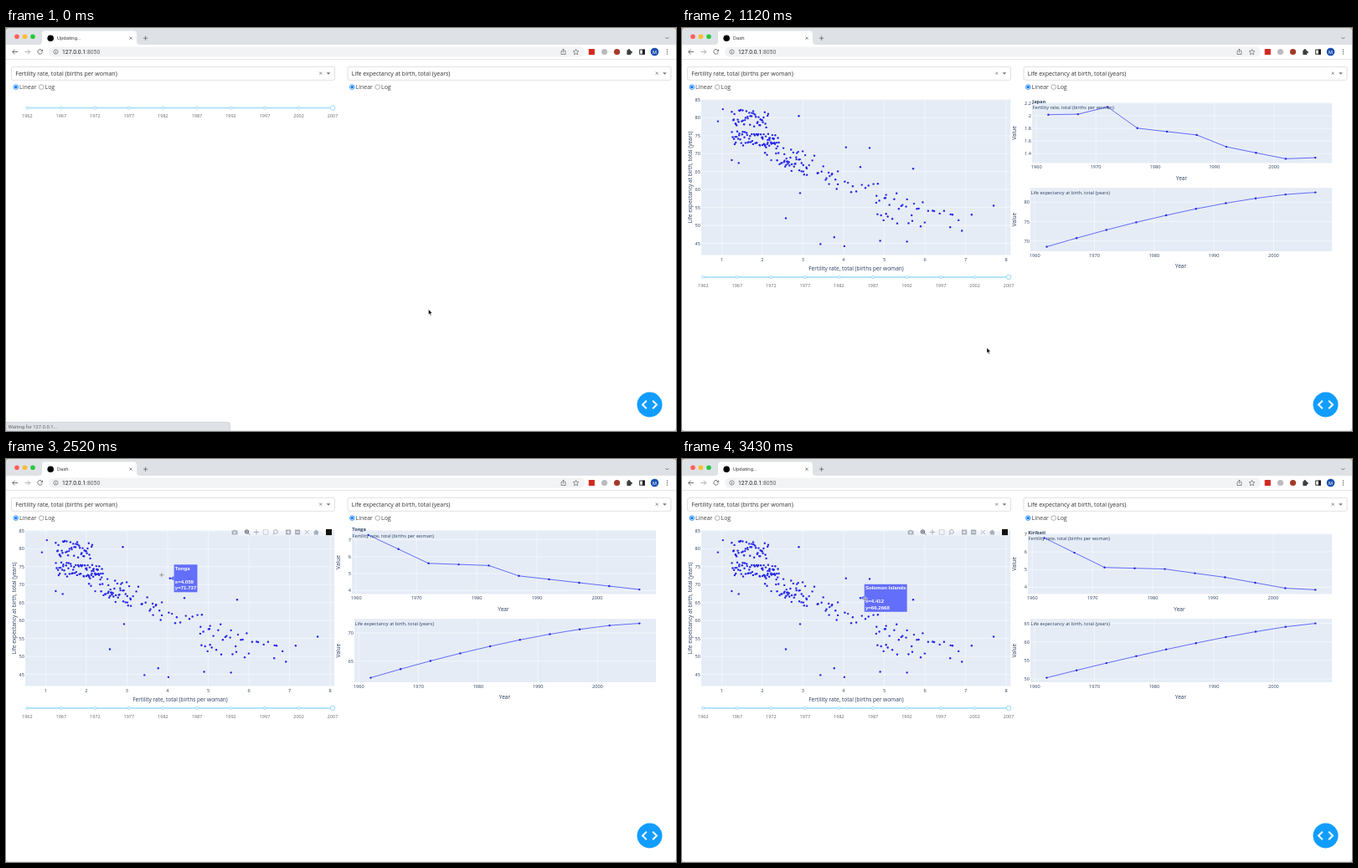
Recreate the animation shown at these times as an HTML page. Size 800 by 482 pixels, loop 3500 ms.

```html
<!DOCTYPE html>
<html lang="en">
<head>
<meta charset="utf-8">
<title>Dash</title>
<style>
  html, body { margin: 0; width: 100%; height: 100%; overflow: hidden; background: #fff; }
  svg { display: block; width: 800px; height: 482px; }
  text { font-family: "Open Sans", sans-serif; white-space: pre; }
  .ui { font-family: Roboto, sans-serif; }
  .tip { font-family: "Liberation Sans", Arial, sans-serif; font-weight: 700; }
</style>
</head>
<body>
<svg id="stage" viewBox="0 0 800 482"></svg>
<script>
const LOOP = 3500, STEP = 70;
const INK = '#2a3f5f', GREY = '#5f6368', PLOT = '#e5ecf6', LINE = '#5c66f5', DOT = '#2626e6';
const FERT = 'Fertility rate, total (births per woman)';
const LIFE = 'Life expectancy at birth, total (years)';

const attrs = o => Object.entries(o).map(([k, v]) => ` ${k}="${v}"`).join('');
const el = (tag, o, body = '') => `<${tag}${attrs(o)}>${body}</${tag}>`;
const rect = (x, y, width, height, fill, o = {}) => el('rect', { x, y, width, height, fill, ...o });
const circle = (cx, cy, r, fill, o = {}) => el('circle', { cx, cy, r, fill, ...o });
const ring = (x, y, r, stroke, w, fill = '#fff') => circle(x, y, r, fill, { stroke, 'stroke-width': w });
const path = (d, stroke, w = 1) => el('path', { d, fill: 'none', stroke, 'stroke-width': w });
const shape = (d, fill, o = {}) => el('path', { d, fill, ...o });
const text = (x, y, s, size, fill = INK, o = {}) => el('text', { x, y, 'font-size': size, fill, ...o }, s);
const MID = { 'text-anchor': 'middle' }, END = { 'text-anchor': 'end' }, UI = { class: 'ui' };
const turned = (x, y, s) =>
  text(0, 0, s, 6.56, INK, { ...MID, transform: `translate(${x} ${y}) rotate(-90)` });
const cross = (x, y, r) => `M${x - r} ${y - r}l${2 * r} ${2 * r}m0 ${-2 * r}l${-2 * r} ${2 * r}`;
const plus = (x, y, r) => `M${x - r} ${y}h${2 * r}m${-r} ${-r}v${2 * r}`;
const range = (n, f) => Array.from({ length: n }, (_, i) => f(i));
const mix = (a, b, p) => a + (b - a) * p;

function browser() {
  return rect(0, 0, 800, 482, '#c9b68c') + rect(0, 8, 800, 474, '#d5d7da') +
    rect(0, .5, 800, 481, '#fff', { rx: 4 }) +
    shape('M0 20V4.5Q0 .5 4 .5H796Q800 .5 800 4.5V20Z', '#dee1e6') +
    shape('M39 20Q43 20 43 16V7Q43 3.5 46.5 3.5H152.5Q156 3.5 156 7V16Q156 20 160 20Z', '#fff') +
    rect(0, 20, 800, 17.5, '#fff') + rect(0, 37.3, 800, .7, '#dcdee1') +
    rect(51, 22.6, 640, 11.8, '#f1f3f4', { rx: 5.9 }) +
    ['#ff5f57', '#febc2e', '#28c840'].map((c, i) => circle(13 + i * 9.5, 10.2, 2.8, c)).join('') +
    circle(53.2, 12.2, 3.8, '#000') +
    path(cross(149, 12.2, 1.5) + plus(166.6, 12.2, 2.6) + 'M787.4 11l2 2 2 -2', GREY, .8) +
    path('M14 28.5H7.7m2.8 -2.8l-2.8 2.8 2.8 2.8', GREY, .9) +
    path('M22.5 28.5h6.3m-2.8 -2.8l2.8 2.8 -2.8 2.8', '#a5a8ac', .9) +
    path('M43 26.8a2.8 2.8 0 1 0 .3 2.4m.2 -3.5v2h-2', GREY, .9) +
    ring(59.5, 28.5, 2.6, GREY, .7, 'none') + path('M59.5 28v2m0 -3.2v.6', GREY, .7) +
    text(67, 30.9, '127.0.0.1<tspan fill="#5f6368">:8050</tspan>', 6.8, '#202124', UI) +
    path('M664.3 27.5h-1.3v4h5v-4h-1.3m-1.2 2v-4.5m-1.5 1.5l1.5 -1.5 1.5 1.5', GREY, .7) +
    path('M680.5 25.4l1 2.1 2.3 .3 -1.7 1.6 .4 2.3 -2 -1.1 -2 1.1 .4 -2.3 -1.7 -1.6 2.3 -.3z', GREY, .7) +
    rect(695.7, 25, 7.2, 7, '#d22b22', { rx: .6 }) +
    circle(714.5, 28.5, 3.6, '#b9bbbe') + circle(729.5, 28.5, 3.6, '#a33a2a') +
    rect(741.3, 26.5, 5, 5.4, '#3c4043', { rx: .6 }) + circle(743.8, 26.3, 1.2, '#3c4043') +
    circle(746.6, 29, 1.2, '#3c4043') +
    rect(756.7, 26, 5.6, 5.2, 'none', { stroke: '#202124', 'stroke-width': .9 }) +
    rect(759.8, 25.6, 3, 6, '#202124') +
    circle(774.5, 28.5, 4.8, '#1a4fb0') + text(774.5, 30.6, 'M', 5.6, '#fff', { ...UI, ...MID }) +
    range(3, i => circle(789.5, 26 + i * 2.5, .75, GREY)).join('');
}

function controls(x, label) {
  const radio = (dx, name, on) =>
    ring(x + dx, 70.6, 2.8, on ? '#0075ff' : '#777', on ? .8 : .6) +
    (on ? circle(x + dx, 70.6, 1.7, '#0075ff') : '') +
    text(x + dx + 4.3, 73.2, name, 7, '#444');
  return rect(x, 46.3, 386, 16, '#fff', { rx: 2, stroke: '#ccc', 'stroke-width': .6 }) +
    text(x + 4.8, 57, label, 7, '#333') +
    path(cross(x + 369.2, 54.2, 1.5), '#777', .8) +
    shape(`M${x + 376.2} 53.2h4.6l-2.3 2.5z`, '#777') +
    radio(5.3, 'Linear', true) + radio(35.7, 'Log', false);
}

const devButton = () => circle(768.5, 450.5, 15, '#119dff') +
  path('M764.8 445.8l-4.8 4.7 4.8 4.7m7.4 -9.4l4.8 4.7 -4.8 4.7', '#fff', 2);

const slider = y => rect(25, y - .9, 365, 1.8, '#abe2fb') + range(10, i => {
  const x = 25.3 + i * 40.53;
  return ring(x, y, i < 9 ? 1.5 : 2.8, '#8fd6f8', .9) + text(x, y + 11.6, 1962 + i * 5, 5.5, '#666', MID);
}).join('');

function modebar(x, y) {
  const c = '#a9b0bd', dark = '#555d6b';
  return el('g', { transform: `translate(${x} ${y})` },
    rect(-5, -4, 121.5, 8, '#fff', { opacity: .4 }) +
    shape('M-3.5 -1.8h1.8l.6 -1h2.2l.6 1h1.8v4.8h-7z', c) + circle(0, .4, 1.4, PLOT) +
    ring(14.5, -.5, 2.2, dark, 1, 'none') + path('M16.2 1.2l2 2' + plus(14.5, -.5, 1.1), dark, .9) +
    path(plus(26, 0, 3.1), c) +
    rect(34.2, -2.8, 5.8, 5.6, 'none', { stroke: c, 'stroke-width': .8, 'stroke-dasharray': '1.4 .7' }) +
    ring(49, -.5, 2.4, c, 1, 'none') + path('M47 1l-.8 2.2', c) +
    rect(61, -3, 6.2, 6, c) + path(plus(64.1, 0, 1.8), '#fff', .9) +
    rect(72, -3, 6.2, 6, c) + path('M73.3 0h3.6', '#fff', .9) +
    path(cross(86.3, 0, 2.6), c, .9) +
    shape('M93.8 .2l3.6 -3.2 3.6 3.2h-1v2.8h-5.2v-2.8z', c) +
    rect(109, -3.6, 7, 7.2, '#111'));
}

// Curves over the ten surveys, from 0 to 1
const rise = bend => i => 1 - (1 - i / 9) ** bend;
const fall = (mid, k) => i => 1 / (1 + Math.exp((i - mid) * k));
const bent = (...keys) => i => {
  const b = Math.max(1, keys.findIndex(k => k[0] >= i));
  const [i0, p0] = keys[b - 1], [i1, p1] = keys[b];
  return mix(p0, p1, (i - i0) / (i1 - i0));
};

// at: place in the scatter plot; fert and life: lowest, highest, curve
const PLACES = {
  Japan: {
    fert: [1.32, 2.14, bent([0, .85], [1, .86], [2, 1], [3, .59], [5, .46], [6, .23], [8, 0], [9, .02])],
    life: [68.5, 82.56, rise(1.47)]
  },
  Kenya: { at: [4.803, 56.331], fert: [4.85, 8.1, fall(5.05, 1.05)], life: [47.4, 59.3, i => Math.sin(i * .36)] },
  'Solomon Islands': { at: [4.412, 66.2668], fert: [4.41, 7.25, fall(5, .8)], life: [51, 66.27, rise(1.2)] },
  Tonga: {
    at: [4.059, 71.737],
    fert: [4.06, 7.28, bent([0, 1], [2, .48], [4, .44], [5, .25], [9, 0])],
    life: [62.06, 71.68, rise(1.47)]
  },
  World: {
    at: [2.542742, 69.84195],
    fert: [2.54, 5.02, bent([0, 1], [1, .98], [3, .57], [5, .38], [7, .085], [9, 0])],
    life: [48.3, 72.56, rise(1.15)]
  },
  Kiribati: {
    at: [3.858, 65.074],
    fert: [3.86, 6.79, bent([0, 1], [2, .43], [4, .4], [6, .24], [8, .03], [9, 0])],
    life: [50.3, 65, rise(1.25)]
  }
};

const px = v => 47.3 + (v - 1) * 48.55, py = v => 257.5 - (v - 45) * 4.29;

// Clouds of points: count, fertility range, life expectancy range, slope
const CLOUDS = [
  [46, 1.25, 2.15, 78, 82.5, -1], [62, 1.25, 2.4, 72.5, 76.5, -1], [44, 2, 3.1, 69, 76, -5],
  [24, 2.5, 3.8, 65.5, 72, -3], [18, 3.5, 5.1, 60, 65, -2], [26, 4.8, 6, 51.5, 60, -2], [8, 6, 6.9, 53, 56, -3]
];
const LONERS = [
  [.91, 79], [1.03, 82.4], [1.25, 68.2], [1.42, 67.4], [2.9, 80.5], [2.58, 52], [2.93, 59], [3.43, 44.8],
  [3.77, 46.7], [4.02, 44.2], [4.9, 45.7], [5.56, 45.5], [5.71, 65.8], [4.64, 71.6], [7.69, 55.5], [7.15, 53],
  [6.91, 48.5], [6.62, 49.5]
];

function scatter() {
  let seed = 29;
  const rnd = () => (seed = (seed * 16807) % 2147483647) / 2147483647;
  const points = [...LONERS, ...Object.values(PLACES).filter(p => p.at).map(p => p.at)];
  for (const [n, f0, f1, l0, l1, slope] of CLOUDS)
    for (let i = 0; i < n; i++) {
      const f = mix(f0, f1, (i + rnd()) / n);
      points.push([f, mix(l0, l1, rnd()) + slope * (f - f0)]);
    }
  const xs = range(8, i => i + 1), ys = range(9, i => 45 + i * 5);
  return rect(23, 85.3, 369.3, 186.2, PLOT) +
    path(xs.map(v => `M${px(v)} 85.3V271.5`).join('') + ys.map(v => `M23 ${py(v)}H392.3`).join(''), '#fff', .5) +
    xs.map(v => text(px(v), 278.5, v, 5.6, INK, MID)).join('') +
    ys.map(v => text(22, py(v) + 2, v, 5.6, INK, END)).join('') +
    points.map(([f, l]) => circle(px(f).toFixed(1), py(l).toFixed(1), 1.2, DOT)).join('') +
    text(208, 290, FERT, 6.56, INK, MID) + turned(12, 178.5, LIFE);
}

// The axis fits the data with a margin; wide or high tick labels push the plot in
function lineChart(title, [lo, hi, curve], top, bottom, name) {
  const span = hi - lo, pad = span * .0825;
  const step = span < 1 ? .2 : span < 5 ? 1 : span < 20 ? 5 : 10;
  const first = Math.ceil((lo - pad) / step);
  const ticks = range(Math.floor((hi + pad) / step) - first + 1, i => +((first + i) * step).toFixed(1));
  if (hi + pad - ticks[ticks.length - 1] < span * .04 && name) top += 3.8;
  const x = step < 1 ? 418 : step < 5 ? 413 : 416, x60 = x + 5.2;
  const atYear = year => mix(x60, 756.3, (year - 1960) / 47);
  const yOf = v => mix(bottom, top, (v - lo + pad) / (span + 2 * pad));
  const years = range(5, i => 1960 + i * 10);
  const pts = range(10, i => [atYear(1962 + i * 5).toFixed(1), yOf(mix(lo, hi, curve(i))).toFixed(1)]);
  return rect(x, top, 776 - x, bottom - top, PLOT) +
    path(years.map(v => `M${atYear(v)} ${top}V${bottom}`).join('') +
      ticks.map(v => `M${x} ${yOf(v)}H776`).join(''), '#fff', .5) +
    years.map(v => text(atYear(v), bottom + 6.7, v, 5.6, INK, MID)).join('') +
    ticks.map(v => text(x - 1, yOf(v) + 2, v, 5.6, INK, END)).join('') +
    path('M' + pts.map(p => p.join(' ')).join('L'), LINE, .95) +
    pts.map(p => circle(...p, 1.2, DOT)).join('') +
    text(x + .6, top + 8, title, 5.62) +
    (name ? text(x + .3, top + .6, name, 5.62, INK, { 'font-weight': 700 }) : '') +
    text((x + 776) / 2 - .5, bottom + 20, 'Year', 6.56, INK, MID) + turned(399.3, (top + bottom) / 2, 'Value');
}

const pen = document.createElement('canvas').getContext('2d');
pen.font = 'bold 6.07px "Liberation Sans", Arial, sans-serif';

function tooltip(name) {
  const [f, l] = PLACES[name].at, x = px(f), y = py(l), left = x + 4.8, top = y - 16.5;
  const lines = [name, `x=${f}`, `y=${l}`];
  const w = Math.max(...lines.map(s => pen.measureText(s).width)) + 2.4;
  return shape(`M${x} ${y}l4.8 -2.8v5.6z`, '#636efa') + rect(left, top, w, 33, '#636efa') +
    lines.map((s, i) => text(left + 1.2, top + (i ? 15 + i * 7.5 : 6.7), s, 6.07, '#fff', { class: 'tip' })).join('');
}

// from, until, name, pointer offset from the point
const HOVERS = [
  [1540, 1540, 'Kenya', 3, 2], [1610, 2240, 'Solomon Islands', 6, 1], [2310, 2590, 'Tonga', -10, -4],
  [2730, 3080, 'World', 7, 3], [3220, 3360, 'Kiribati', 3, 1], [3430, LOOP, 'Solomon Islands', 6, 1]
];
const MOVES = [[0, 504.5, 336.5], [630, 504.5, 336.5], [1120, 364, 382.5],
  ...HOVERS.flatMap(([from, until, name, dx, dy]) => {
    const [f, l] = PLACES[name].at;
    return [from, until].map(t => [t, px(f) + dx, py(l) + dy]);
  })];

function place(t) {
  const i = MOVES.findIndex(m => m[0] > t);
  const [t0, x0, y0] = MOVES[i - 1], [t1, x1, y1] = MOVES[i];
  const p = (t - t0) / (t1 - t0), e = p * p * (3 - 2 * p);
  return [mix(x0, x1, e), mix(y0, y1, e)];
}

const inPlot = (x, y) => x > 23 && x < 392 && y > 85 && y < 271;

function pointer(x, y) {
  if (inPlot(x, y)) return path(plus(x, y, 2.7), '#fff', 1.3) + path(plus(x, y, 2.7), '#333', .5);
  return shape(`M${x} ${y}v6.2l1.4 -1.2 1 2.2 1 -.4 -1 -2.2h1.9z`, '#000', { stroke: '#fff', 'stroke-width': .4 });
}

const statusBar = opacity => el('g', { opacity },
  shape('M0 471.5H264.5Q267.5 471.5 267.5 474.5V482H0Z', '#dee1e6', { stroke: '#c3c6ca', 'stroke-width': .6 }) +
  text(2.8, 479.2, 'Waiting for 127.0.0.1...', 5.8, GREY, UI));

const stage = document.getElementById('stage');
stage.innerHTML = browser() + controls(6.5, FERT) + controls(408, LIFE) +
  '<g id="early"></g><g id="plot"></g><g id="live"></g>' + devButton() + '<g id="over"></g>';
const [early, plot, live, over] = ['early', 'plot', 'live', 'over'].map(id => document.getElementById(id));
early.innerHTML = slider(95.5);
plot.innerHTML = scatter() + slider(298);

// Name shown by a chart that answers a hover after some delay
const shown = t => HOVERS.reduce((name, h) => t >= h[0] ? h[2] : name, 'Japan');

function draw(t) {
  const ready = t >= STEP, pos = place(t);
  const hover = HOVERS.find(([from, until]) => t >= from && t < Math.max(until, from + STEP));
  const busy = t < 3 * STEP || HOVERS.some(([from]) => t >= from && t < from + STEP);
  early.style.display = ready ? 'none' : '';
  plot.style.display = ready ? '' : 'none';
  let s = text(61, 14.2, busy ? 'Updating...' : 'Dash', 6, '#3c4043', UI);
  if (ready) {
    const name = shown(t - 2 * STEP);
    s += lineChart(FERT, PLACES[name].fert, 85.5, 161.5, name) +
      lineChart(LIFE, PLACES[shown(t - 3 * STEP)].life, 191.2, 267);
    if (t < 630) s += modebar(661, 193.2);
    if (inPlot(...pos)) s += modebar(273, 87.5);
    if (hover) s += tooltip(hover[2]);
  }
  live.innerHTML = s;
  over.innerHTML = (t < 3 * STEP ? statusBar(t < 2 * STEP ? 1 : .6) : '') + pointer(...pos);
}

const start = performance.now();
let last = -1;
function tick() {
  const t = Math.floor(((performance.now() - start) % LOOP) / STEP) * STEP;
  if (t !== last) draw(last = t);
  requestAnimationFrame(tick);
}
tick();
</script>
</body>
</html>
```
